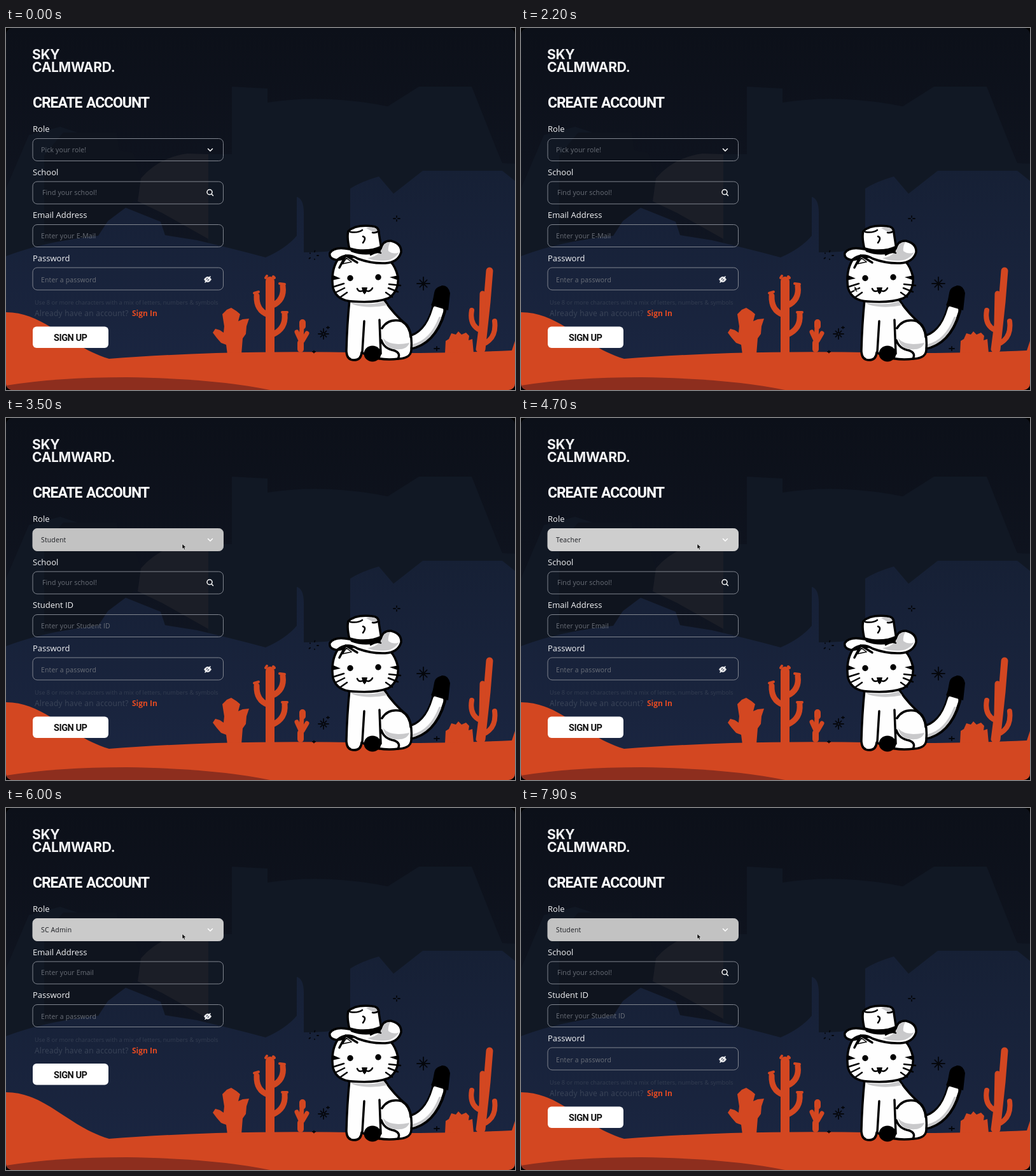
Write an HTML page that moves like this. It is 800 px wide and 568 px high and loops after 8000 ms.

```html
<!DOCTYPE html>
<html lang="en">
<head>
<meta charset="utf-8">
<title>Create account</title>
<style>
html, body { margin: 0; height: 100%; overflow: hidden; background: #000; }
svg { display: block; width: 800px; height: 568px; }
text { font-family: "Open Sans", "Noto Sans", sans-serif; fill: #f4f5f7; }
.mark { font: 700 21px Inter, sans-serif; letter-spacing: -.3px; }
.title { font: 700 23px Roboto, sans-serif; letter-spacing: -1.1px; word-spacing: 2px; fill: #fff; }
.label { font-size: 13px; }
.value { font-size: 10.5px; letter-spacing: .15px; fill: #6b7079; }
.picked { fill: #1b1d22; }
.hint { font-size: 9.3px; fill: #343e52; }
.ask { font-size: 12px; letter-spacing: .25px; fill: #3b4559; }
.link { font-size: 12px; font-weight: 700; fill: #e24a22; }
.button { font: 700 14.5px Roboto, sans-serif; letter-spacing: -.5px; fill: #111; }
.box { fill: none; stroke: #80858f; }
.icon { fill: none; stroke: #fff; stroke-width: 1.5; stroke-linecap: round; stroke-linejoin: round; }
.plant { fill: none; stroke: #d34721; stroke-linecap: round; stroke-linejoin: round; }
.land { fill: #d34721; }
.cat { fill: #fefefe; stroke: #000; stroke-width: 3.5; stroke-linecap: round; stroke-linejoin: round; }
.line { fill: none; stroke-width: 2.5; }
.shade { fill: #c9c9cb; stroke: none; }
.ink { fill: #000; stroke: none; }
.spark { stroke: #05070c; stroke-width: 1.8; stroke-linecap: round; }
</style>
</head>
<body>
<svg viewBox="0 0 800 568">
  <defs>
    <linearGradient id="sky" x2="0" y2="1">
      <stop stop-color="#0c1019"/><stop offset=".5" stop-color="#0f1420"/><stop offset="1" stop-color="#121927"/>
    </linearGradient>
    <linearGradient id="near" gradientUnits="userSpaceOnUse" x1="0" y1="225" x2="0" y2="520">
      <stop stop-color="#162035"/><stop offset="1" stop-color="#1a2540"/>
    </linearGradient>
    <clipPath id="card"><rect width="800" height="568" rx="10"/></clipPath>
  </defs>
  <g clip-path="url(#card)">
    <path fill="url(#sky)" d="M0 0H800V568H0z"/>
    <path fill="#111824" d="M355 92L411 95V117Q500 103 600 123L649 92H732L770 188 780 212 800 213V400H317V198H355z
      M0 252L36 168 85 155 130 170V360H0z"/>
    <path fill="#0f141e" d="M90 164H174L178 192 200 196 212 236 207 266 188 282 150 335H60V200z"/>
    <path fill="url(#near)" d="M0 358Q60 335 145 326L160 303 188 282 243 304 250 325 300 333Q360 347 408 360
      Q440 346 457 326V265Q468 268 468 290V352Q515 352 541 344V252Q558 241 586 233L609 260 655 224H780L800 240V568H0z"/>
    <path fill="#1b1e27" d="M212 236Q240 203 285 197L318 198V331L245 290 207 272z"/>

    <path class="land" d="M340 449L347 442 354 439 362 444 368 449 365 460 372 457 382 456 378 468 377 480 372 487 370 512
      H348L346 497 338 494 331 486 325 478 329 472 336 474 342 478 343 468z
      M690 510L691 491 696 488 700 479 707 481 711 476 716 481 723 478 728 483 727 490 733 488 735 510z"/>
    <g class="plant">
      <path stroke-width="14" d="M415 397V508"/>
      <path stroke-width="9" d="M394 420Q393 443 412 450M435 405Q438 427 418 436M438 449Q440 472 419 481"/>
      <path stroke-width="4" d="M408 392L410 389M420 390L422 392M390 416L397 414M430 401L438 402M434 446L442 446"/>
      <path stroke-width="10" d="M466 462V468M463 494V504"/>
      <path stroke-width="7" d="M457 477L462 488M473 479L466 491M465 468L464 490"/>
      <path stroke-width="11" d="M760 381L756 430 748 504"/>
      <path stroke-width="9" d="M749 417L748 465 743 504"/>
      <path stroke-width="8" d="M732 443Q728 466 745 474M768 460Q771 484 754 494"/>
    </g>
    <path class="land" d="M0 446C62 446 97 500 162 519Q240 513 330 510 440 507 540 509 660 512 795 506L800 491V568H0z"/>
    <path fill="#8d2e1e" d="M0 561Q80 548 190 548 330 550 415 568H0z"/>
    <g id="sparks" class="spark"></g>

    <g class="cat">
      <path fill="none" stroke-width="24" d="M632 494Q667 488 680 443L685 417"/>
      <path fill="none" style="stroke:#fefefe" stroke-width="17" d="M632 494Q666 488 679 443"/>
      <path fill="none" style="stroke:#c9c9cb" stroke-width="4" d="M640 498Q668 491 682 455"/>
      <path class="ink" d="M668 435L695 443 698 416Q695 403 685 404 675 408 674 420z"/>
      <path d="M540 426Q536 465 535 506 535 521 547 521 558 521 559 509L570 515Q592 522 617 519 638 518 637 503 639 479 630 466 610 450 594 426z"/>
      <path class="shade" d="M541 430Q570 437 594 429L599 435Q570 441 546 434z"/>
      <path class="line" style="stroke-width:3.5" d="M560 508L563 460M587 458L589 511M591 471Q601 455 622 460 635 468 636 485M590 490Q594 503 610 506 621 510 616 519"/>
      <path class="shade" d="M593 487Q604 500 634 494 630 506 611 504 596 502 593 487z"/>
      <ellipse class="ink" cx="576" cy="511" rx="13.5" ry="12.5"/>
      <path d="M521 364Q510 382 514 408 520 428 545 429 580 432 601 424 618 413 616 390 612 374 604 366L560 356z"/>
      <path class="ink" d="M512 387L526 393 512 396zM617 388L603 391 617 396z"/>
      <path class="line" d="M515 406L531 401M518 415L532 408M526 422L536 415M620 404L602 402M616 414L601 408M607 422L597 415"/>
      <circle class="ink" cx="541" cy="392.5" r="4.7"/><circle class="ink" cx="585" cy="391" r="4.7"/>
      <path class="ink" d="M559 407H568L566 415 563.5 418 561 415z"/>
      <path class="line" d="M552 409Q555 416 563 411 572 416 576 408"/>
      <path d="M541 351Q535 329 538 319 549 308 576 311 586 312 586 321L590 347z"/>
      <path class="shade" d="M566 314Q581 310 584 319L577 320z"/>
      <path class="line" d="M541 320Q553 322 560 317M576 321Q582 322 586 318M561 327Q567 329 561 337"/>
      <path d="M509 353Q516 342 540 347 565 358 589 347 592 333 605 334 622 338 621 352 616 368 596 369 575 370 553 362 535 351 520 364 507 362 509 353z"/>
      <path class="shade" d="M591 346Q594 336 604 336 600 343 601 350 609 356 618 352 608 366 591 365 577 365 568 361 585 359 591 346z"/>
      <path class="ink" d="M540 344Q566 352 588 342L589 351Q566 360 542 351z"/>
      <path class="line" d="M573 356Q583 350 589 353"/>
      <path stroke="none" d="M524 379L534 357 553 369 550 380z"/>
      <path fill="none" d="M524 376L534 357 552 368"/>
      <path class="line" style="stroke-width:1.5" d="M529 370L535 361 543 367z"/>
    </g>

    <text class="mark" x="41" y="49">SKY</text>
    <text class="mark" x="41" y="69">CALMWARD.</text>
    <text class="title" x="42" y="125">CREATE ACCOUNT</text>
    <g id="form"></g>
    <path id="cursor" fill="#000" stroke="#fff" stroke-width=".6" d="M0 0V8L1.9 6.3 3.3 9.3 4.8 8.6 3.4 5.8H6z"/>
  </g>
</svg>
<script>
const $ = id => document.getElementById(id);
const LOOP = 8000, STEP = 67.5;

const school = ['School', 'Find your school!', 'search', 57];
const email = ['Email Address', 'Enter your Email'];
const password = ['Password', 'Enter a password', 'eye'];
const blank = [school, ['Email Address', 'Enter your E-Mail'], password];
const views = {
  empty: { fields: blank },
  hover: { fill: '#c8c8c8', fields: blank },
  student: { role: 'Student', fill: '#c2c2c2', fields: [school, ['Student ID', 'Enter your Student ID'], password] },
  teacher: { role: 'Teacher', fill: '#cecece', fields: [school, email, password] },
  admin: { role: 'SC Admin', fill: '#cacaca', fields: [email, password] }
};
const timeline = [[0, 'empty'], [2600, 'hover'], [2800, 'student'], [4000, 'teacher'], [5700, 'admin'], [7400, 'student']];

// Pointer stops: time, x, y
const route = [[1600, 610, -10], [2200, 524, 405], [2650, 277, 197.5]];

const icons = {
  arrow: '<path class="icon" d="M317.5 189.500l3.500 3.500 3.500-3.500"/>',
  search: '<circle class="icon" cx="320" cy="190" r="4"/><path class="icon" d="M323 193l2.500 2.500"/>',
  eye: '<path fill="#e4e5e8" d="M311 192Q317 183 323 192 317 201 311 192z"/>' +
    '<circle cx="317" cy="192" r="2" fill="#263047"/><path class="icon" d="M313 196.500l8-9"/>'
};

const text = (cls, x, y, s) => `<text class="${cls}" x="${x}" y="${y}">${s}</text>`;

function field([label, value, icon, x = 55], i, fill, picked) {
  const nudge = icon === 'eye' ? 1.5 : 0;
  const style = fill ? ` style="fill:${fill};stroke:${fill}"` : '';
  return `<g transform="translate(0 ${i * STEP})">` + text('label', 42, 163, label) +
    `<rect class="box" x="42" y="173.500" width="299.500" height="35" rx="7"${style}/>` +
    text(picked ? 'value picked' : 'value', x, 194.5 + nudge, value) + (icons[icon] || '') + '</g>';
}

function form({ role, fill, fields }) {
  const shift = (fields.length - 3) * STEP;
  return field(['Role', role || 'Pick your role!', 'arrow'], 0, fill, role) +
    fields.map((f, i) => field(f, i + 1)).join('') +
    `<g transform="translate(0 ${shift})">` +
    text('hint', 45, 434, 'Use 8 or more characters with a mix of letters, numbers &amp; symbols') +
    text('ask', 45, 452, 'Already have an account?') + text('link', 198, 452, 'Sign In') +
    '<rect x="42" y="468.500" width="119" height="33.500" rx="6" fill="#fff"/>' +
    text('button', 75, 491, 'SIGN UP') + '</g>';
}

// Each sparkle: centre, outer radius, ray count, inner radius
const sparks = [[656, 401, 10, 8, 1], [499, 480, 8, 8, 2], [614, 299, 5, 4, 2],
  [483, 357, 8, 5, 6], [677, 503, 4, 4, 1], [506, 470, 2, 4, 1], [484, 508, 2, 4, 1]];
$('sparks').innerHTML = sparks.map(([x, y, r, n, inner]) => {
  let d = '';
  for (let i = 0; i < n; i++) {
    const a = i * 2 * Math.PI / n, c = Math.cos(a), s = Math.sin(a), len = i % 2 ? r * .8 : r;
    d += `M${x + c * inner} ${y + s * inner}L${x + c * len} ${y + s * len}`;
  }
  return `<path d="${d}"/>`;
}).join('');

function pointer(t) {
  const i = route.findIndex(([time]) => time > t);
  if (i < 0) return route.at(-1).slice(1);
  if (!i) return route[0].slice(1);
  const [t0, x0, y0] = route[i - 1], [t1, x1, y1] = route[i];
  const u = (t - t0) / (t1 - t0), ease = u * u * (3 - 2 * u);
  return [x0 + (x1 - x0) * ease, y0 + (y1 - y0) * ease];
}

const start = performance.now();
let shown;
function draw() {
  const t = (performance.now() - start) % LOOP;
  const view = timeline.findLast(([time]) => t >= time)[1];
  if (view !== shown) $('form').innerHTML = form(views[shown = view]);
  $('cursor').setAttribute('transform', `translate(${pointer(t)})`);
  requestAnimationFrame(draw);
}
draw();
</script>
</body>
</html>
```
